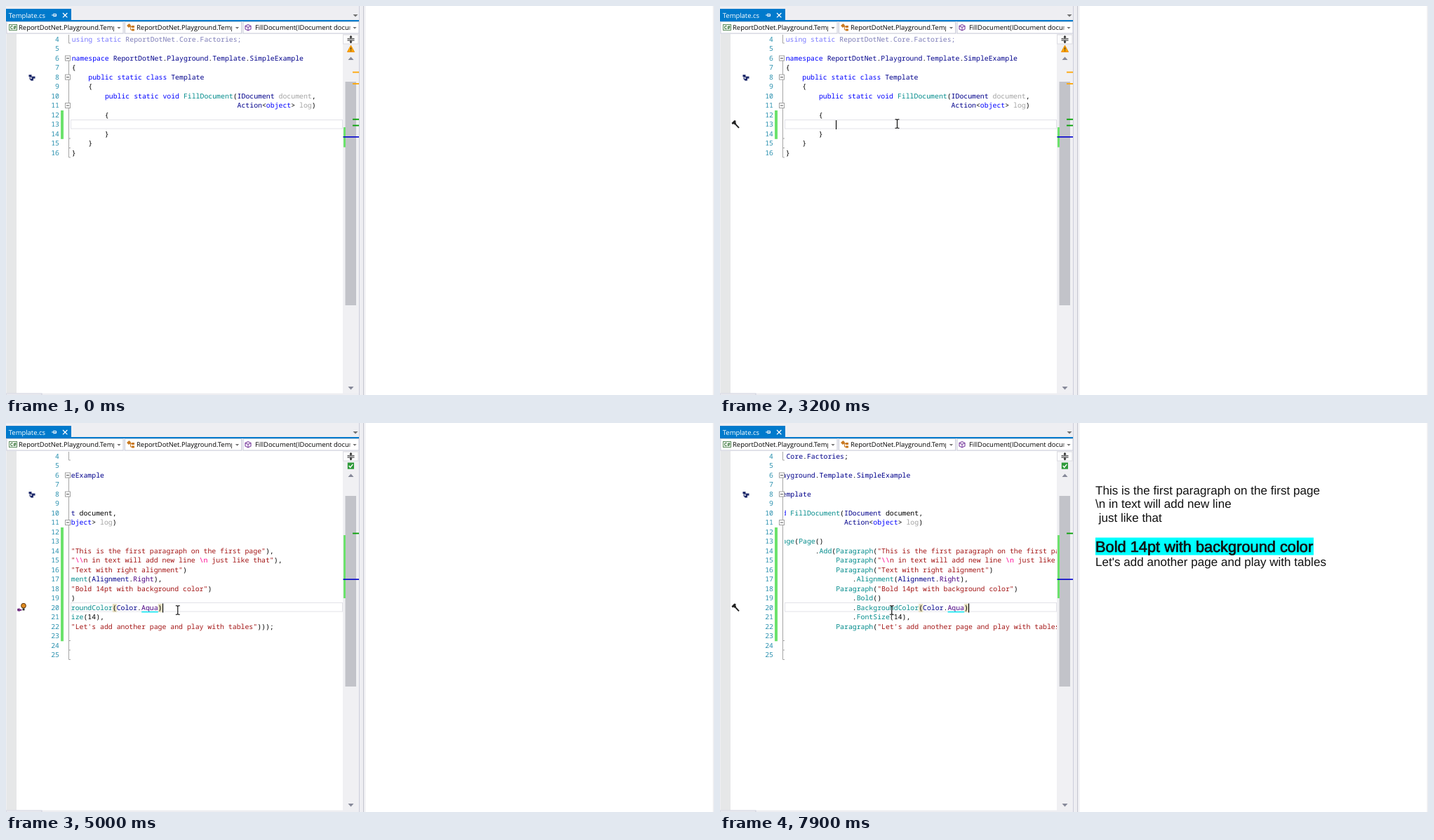
Write an HTML page that moves like this. It is 1009 px wide and 555 px high and loops after 8 s.

```html
<!DOCTYPE html>
<html lang="en">
<head>
<meta charset="utf-8">
<title>Editor and document preview</title>
<style>
html, body { margin: 0; width: 100%; height: 100%; overflow: hidden; background: #fff; }
svg { display: block; width: 1009px; height: 555px; }
text { white-space: pre; text-rendering: geometricPrecision; }
.code { font: 9.83px "Noto Sans Mono", monospace; }
.ui { font: 9.45px "Open Sans", sans-serif; }
.doc { font: 17.08px "Liberation Sans", Arial, sans-serif; fill: #111; }
</style>
</head>
<body>
<svg viewBox="0 0 1009 555" xmlns="http://www.w3.org/2000/svg">
  <defs>
    <clipPath id="editor"><rect x="92" y="40" width="388" height="512"/></clipPath>
    <clipPath id="nav1"><rect x="0" y="22" width="154" height="18"/></clipPath>
    <clipPath id="nav2"><rect x="169" y="22" width="153" height="18"/></clipPath>
    <clipPath id="nav3"><rect x="338" y="22" width="152.5" height="18"/></clipPath>
  </defs>
  <g id="frame"></g>
  <g id="scene"></g>
</svg>
<script>
const LOOP = 8000, STEP = 100;
const CHAR = 5.9, LEFT = 93.7, ROW = 13.5;
const PASTE = 3400, ANALYSED = 3800, CLICK = 4700, SAVE = 4900, PREVIEW = 5800, HOME = 6100, SELECT = 7100, END = 7300;
const GREEN = '#6ce26c', YELLOW = '#ffee62';

const INK = {
  k: '#0000ff', n: '#00008b', t: '#008b8b', g: '#a3a3a3', s: '#a31515',
  e: '#ff0090', p: '#4b0082', x: '#000', u: '#7a7aff', f: '#7d7db8'
};

// "~c" switches the ink for the text that follows
const OPENING = [
  '~kusing static ~nReportDotNet~x.~nCore~x.~nFactories~x;',
  '',
  '~knamespace ~nReportDotNet~x.~nPlayground~x.~nTemplate~x.~nSimpleExample',
  '{',
  '    ~kpublic static class ~nTemplate',
  '    {',
  '        ~kpublic static void ~tFillDocument~x(~nIDocument ~xdocument,',
  ' '.repeat(40) + '~nAction~x<~kobject~x> ~glog~x)',
  '        {'
];
const CLOSING = ['        }', '    }', '}'];
const pad = n => ' '.repeat(n);
const ADDED = [
  pad(12) + 'document.~tAddPage~x(~tPage~x()',
  pad(33) + '.~tAdd~x(~tParagraph~x(~s"This is the first paragraph on the first page"~x),',
  pad(38) + '~tParagraph~x(~s"~e\\\\~sn in text will add new line ~e\\n~s just like that"~x),',
  pad(38) + '~tParagraph~x(~s"Text with right alignment"~x)',
  pad(42) + '.~tAlignment~x(~nAlignment~x.~pRight~x),',
  pad(38) + '~tParagraph~x(~s"Bold 14pt with background color"~x)',
  pad(42) + '.~tBold~x()',
  pad(42) + '.~tBackgroundColor~x(~nColor~x.~pAqua~x)',
  pad(42) + '.~tFontSize~x(14),',
  pad(38) + '~tParagraph~x(~s"Let\'s add another page and play with tables"~x)));'
];

const rowTop = n => 41.3 + (n - 4) * ROW;
const escapeText = s => s.replace(/&/g, '&amp;').replace(/</g, '&lt;');
const rect = (x, y, w, h, fill, extra = '') =>
  `<rect x="${x}" y="${y}" width="${w}" height="${h}" fill="${fill}" ${extra}/>`;
const path = (d, fill, stroke = 'none', extra = '') =>
  `<path d="${d}" fill="${fill}" stroke="${stroke}" ${extra}/>`;
const label = (cls, x, y, s, extra = '') =>
  `<text class="${cls}" x="${x}" y="${y}" ${extra}>${escapeText(s)}</text>`;
const at = (x, y, body, opacity = 1) =>
  `<g transform="translate(${x} ${y})" opacity="${opacity}">${body}</g>`;
const triangle = (x, y, w, h, fill = '#717171') => path(`M${x - w} ${y}h${2 * w}l${-w} ${h}z`, fill);

function codeLine(source, row, x) {
  const parts = source.split(/~(.)/);
  let spans = escapeText(parts[0]);
  for (let i = 1; i < parts.length; i += 2)
    spans += `<tspan fill="${INK[parts[i]]}">${escapeText(parts[i + 1])}</tspan>`;
  return `<text class="code" x="${x}" y="${rowTop(row) + 9.3}">${spans}</text>`;
}

function drawFrame() {
  const combo = (x, w, clip, textX, s) =>
    rect(x + .5, 22.5, w, 16.5, '#fff', 'stroke="#ccceDB"') +
    `<g clip-path="url(#${clip})">${label('ui', textX, 34.3, s)}</g>` +
    triangle(x + w - 5.5, 30, 2.6, 2.8);
  return rect(0, 0, 510, 555, '#eeeef2') +
    rect(0, 20, 503, 2, '#007acc') +
    triangle(498, 12, 3.5, 3.5) +
    combo(0.5, 166, 'nav1', 18, 'ReportDotNet.Playground.Template') +
    combo(169, 166, 'nav2', 186, 'ReportDotNet.Playground.Template') +
    combo(337.5, 165, 'nav3', 355, 'FillDocument(IDocument document') +
    rect(4.5, 26.5, 11, 8, '#fff', 'stroke="#5a8a5a"') +
    label('ui', 5.7, 33.2, 'C#', 'style="font-size:7px;font-weight:bold" fill="#2b6b2b"') +
    path('M172 28l3.5-3 3 3-3.5 3zM179 28h4v3h-4zM179 32.5h4v3h-4z', '#c97a22') +
    path('M176 29.5h3M177.5 29.5v4.5h2', 'none', '#c97a22') +
    path('M341 28.5l4-2 4 2v4.5l-4 2-4-2zM341 28.5l4 2 4-2M345 30.5V35', '#fff', '#7a3fa0', 'stroke-width="1.1"') +
    rect(0, 40, 480, 512.5, '#fff') + rect(0, 40, 1, 512, '#eeeef2') +
    rect(1, 40, 14, 512.5, '#e6e7e8') +
    rect(480, 40, 23, 512.5, '#f0f0f3') +
    rect(480.5, 41, 21.5, 13, '#fbfbfc', 'stroke="#dcdce2"') +
    path('M486.5 46.7h10M486.5 49h10M491.5 42.5v4M491.5 49v4', 'none', '#1e1e1e', 'stroke-width="1.1"') +
    path('M489.4 45l2.1-3 2.1 3zM489.4 50.6l2.1 3 2.1-3z', '#1e1e1e') +
    triangle(491.5, 77, 4, -4.4, '#868999') + triangle(491.5, 543, 4, 4.4, '#868999') +
    rect(0, 553, 51, 2, '#fff', 'stroke="#ccceDB"') +
    rect(503, 0, 1, 555, '#ccceDB') +
    rect(509, 0, 1.5, 555, '#c4c5d0') + rect(510.5, 0, 498.5, 555, '#fff') +
    rect(510.5, 0, 2, 555, '#f0f0f4') + rect(1007.5, 0, 1.5, 555, '#ececf0') +
    path('M32.5 98h4v3h-4zM37 100.5h4.5v3H37zM35 103.5h4v3h-4z', '#1f2a6b') +
    path('M34 101v3.5h2M35 101.5h3', 'none', '#1f2a6b');
}

function tab(dirty) {
  const shift = dirty ? 4 : 0;
  return rect(0, 4, 93 + shift, 17, '#007acc') +
    label('ui', 3.8, 16.6, dirty ? 'Template.cs*' : 'Template.cs', 'fill="#fff"') +
    at(shift, 0,
      path('M65 13h3M68 10.5v5M68.5 11.5h3v3h-3M68.5 14h3', 'none', '#fff') +
      path('M81 10l6.4 6.4M87.4 10L81 16.4', 'none', '#fff', 'stroke-width="1.3"'));
}

function statusIcon(kind) {
  if (kind === 'warning')
    return path('M491.5 56.2l5 9.3h-10z', '#ffa500', '#f09000', 'stroke-linejoin="round"') +
      rect(491, 59.2, 1.1, 3.2, '#333') + rect(491, 63.3, 1.1, 1.1, '#333');
  if (kind === 'busy')
    return '<circle cx="491.3" cy="61" r="4.4" fill="#fff" stroke="#333" stroke-width="1.2"/>' +
      path('M491.3 61V56.6A4.4 4.4 0 0 1 495.7 61z', '#333') +
      path('M491.3 61h4.4a4.4 4.4 0 0 1-2 3.7z', '#333');
  return rect(486.8, 56.5, 9.2, 9.2, '#2e9a3a') +
    path('M488.7 61l2 2.3 3.6-4.4', 'none', '#fff', 'stroke-width="1.4"');
}

const hammer = path('M-5.5-1.5L-1.5-5.5 1-4.6 0-3 1.2-1.4-1.2 1-2.4-.4-4 .5z', '#222') +
  path('M-.6-.6L5 5.4', 'none', '#222', 'stroke-width="2"');
const bulb = '<circle cx="3" cy="-2.3" r="3.4" fill="#e08a1e" stroke="#5a3510"/>' +
  rect(1.5, 1.4, 3, 3, '#333') + path('M-6 3.5l3-2.2V3h3v1.4h-3V6zM-5.5 1.5v4', '#68217a', '#68217a', 'stroke-width=".6"');

function scrollMarks(t, pasted) {
  const tick = (y, fill) => rect(494, y, 9, 1.8, fill);
  let out = pasted ? rect(483.5, 104, 15.5, 272, '#c2c3c9') : rect(483.5, 108, 15.5, 319, '#c2c3c9');
  if (!pasted) out += tick(93.6, '#ffa500') + tick(110, '#ffa500') + tick(160.8, '#00a000') + tick(169.6, '#00a000');
  else {
    if (t < ANALYSED) out += tick(91.8, '#ffa500') + tick(106, '#ffa500') + tick(150, '#00a000');
    out += tick(156.6, '#00a000');
  }
  out += pasted ? rect(481, 160, 3, 90, GREEN) : rect(481, 173, 3, 28.5, GREEN);
  if (pasted && t < SAVE) out += rect(481, 167, 3, 76, YELLOW);
  const blueY = !pasted ? 186 : t < CLICK ? 236.7 : 222.3;
  return out + rect(480.5, blueY, 22.5, 1.6, '#0000cd');
}

function gutter(t, pasted, lastRow) {
  let out = '';
  for (let n = 4; n <= lastRow; n++)
    out += label('code', 76, rowTop(n) + 9.3, String(n), 'text-anchor="end" fill="#2b91af"');
  const barEnd = rowTop(lastRow - 1);
  out += rect(78, 149, 4, barEnd - 149, GREEN);
  if (pasted && t < SAVE) out += rect(78, 162.5, 4, 134.7, YELLOW);
  const ends = [2, 1, 0].map(k => `M89.5 ${rowTop(lastRow - k + 1) - .8}h2.5`).join('');
  out += path(`M89.5 41V53h2.5M89.5 74V${rowTop(lastRow + 1) - .8}${ends}`, 'none', '#a5a5a5');
  for (const n of [6, 8, 11]) {
    const y = rowTop(n) + 6.2;
    out += rect(84.5, y - 3.5, 7, 7, '#fff', 'stroke="#a0a0a0"') + path(`M86 ${y}h4`, 'none', '#555');
  }
  return out;
}

// Caret intervals as [on, off]; later blinks keep a steady 200 ms beat
const EARLY_BLINKS = [[2600, 2900], [3200, 3400], [3500, 3800], [4200, 4500], [4700, 5100]];
function caretOn(t) {
  if (t < 5100) return EARLY_BLINKS.some(([on, off]) => t >= on && t < off);
  const start = t < HOME ? 4900 : 6300;
  return Math.floor((t - start) / 200) % 2 === 0;
}

function code(t, pasted) {
  const scroll = !pasted ? 0 : t < HOME ? 284 : 152.6;
  const colX = col => LEFT + col * CHAR - scroll;
  const row = !pasted ? 13 : t < CLICK ? 22 : 20;
  const top = rowTop(row);
  const selecting = t >= SELECT && t < END;
  let lines = [...OPENING, ...(pasted ? ADDED : ['']), ...CLOSING];
  if (t < ANALYSED) {
    lines[0] = '~uusing static ~fReportDotNet.Core.Factories;';
    lines[6] = lines[6].replace('~xdocument', '~gdocument~x');
    if (pasted) lines = lines.map((s, i) => i < 9 ? s : s.replace(/~[tnp]/g, '~x').replace(/~e/g, '~s'));
  }
  let out = selecting
    ? rect(colX(42), top, 28 * CHAR, 13.5, '#add6ff')
    : rect(92.5, Math.round(top) - .5, 387, 12.5, '#fff', 'stroke="#e2e2e8"');
  const parens = t >= CLICK && t < HOME || t >= END;
  if (parens) for (const col of [58, 69]) out += rect(colX(col), top + .7, CHAR, 12, '#e6dfc0');
  lines.forEach((s, i) => out += codeLine(s, i + 4, colX(0)));
  if (t >= ANALYSED) out += rect(colX(65), rowTop(20) + 11.5, 4 * CHAR, 1.5, '#00e5f0');
  const caretCol = !pasted ? 12 : t < CLICK ? 97 : t < HOME ? 70 : t < SELECT ? 42 : 70;
  if (caretOn(t)) out += rect(Math.round(colX(caretCol)), top + .2, 1.1, 13, '#000');
  return `<g clip-path="url(#editor)">${out}</g>`;
}

function actionIcon(t) {
  const fade = start => Math.max(0, Math.min(1, (t - start + 100) / 500));
  if (t < ANALYSED) return at(22, 168.5, hammer, fade(2800));
  if (t < SAVE) return '';
  if (t < HOME) return at(22, 263, bulb, t < SAVE + 100 ? .5 : 1);
  return at(22, 263, hammer, fade(t < END ? HOME : END + 100));
}

function preview(t) {
  if (t < PREVIEW) return '';
  return label('doc', 535, 102, 'This is the first paragraph on the first page') +
    label('doc', 535, 121, '\\n in text will add new line') +
    label('doc', 539.7, 140.6, 'just like that') +
    rect(535, 163.5, 311, 25, '#00ffff') +
    label('doc', 535, 183.7, 'Bold 14pt with background color', 'style="font-size:21.8px" stroke="#111" stroke-width=".7"') +
    label('doc', 535, 204.3, "Let's add another page and play with tables");
}

// Pointer stops as [ms, x, y]
const POINTER = [
  [300, 728, 417], [500, 395, 228.5], [700, 395, 228.5], [900, 240, 171], [1000, 240, 171],
  [1200, 225, 179], [1300, 225, 179], [1500, 225, 176], [2200, 225, 176], [2300, 247.5, 170],
  [2400, 252.5, 168], [4100, 252.5, 168], [4500, 244.8, 267], [LOOP, 244.8, 267]
];
function pointer(t) {
  if (t < 300) return '';
  const i = POINTER.findIndex(stop => stop[0] > t);
  const [t0, x0, y0] = POINTER[i - 1], [t1, x1, y1] = POINTER[i];
  const p = (t - t0) / (t1 - t0);
  const x = x0 + (x1 - x0) * p, y = y0 + (y1 - y0) * p;
  const shape = x > 510
    ? path('M.5 .5v16l3.7-3.5 2.5 5.5 2.4-1-2.5-5.4h5z', '#fff', '#000')
    : path('M-3-6.3h2l1 .8 1-.8h2M0-5.5v11M-3 6.3h2l1-.8 1 .8h2', 'none', '#000', 'stroke-width="1.1"');
  return at(x, y, shape);
}

function scene(t) {
  const pasted = t >= PASTE;
  const busy = pasted && t < ANALYSED || t >= SELECT && t < END + 100;
  return tab(pasted && t < SAVE) +
    gutter(t, pasted, pasted ? 25 : 16) +
    code(t, pasted) +
    scrollMarks(t, pasted) +
    statusIcon(!pasted ? 'warning' : busy ? 'busy' : 'ok') +
    actionIcon(t) + preview(t) + pointer(t);
}

const layer = document.getElementById('scene');
document.getElementById('frame').innerHTML = drawFrame();
let shown = -1;
const began = performance.now();
function update() {
  const elapsed = (performance.now() - began) % LOOP;
  const t = Math.floor(elapsed / STEP) * STEP;
  if (t !== shown) layer.innerHTML = scene(shown = t);
  requestAnimationFrame(update);
}
update();
</script>
</body>
</html>
```
